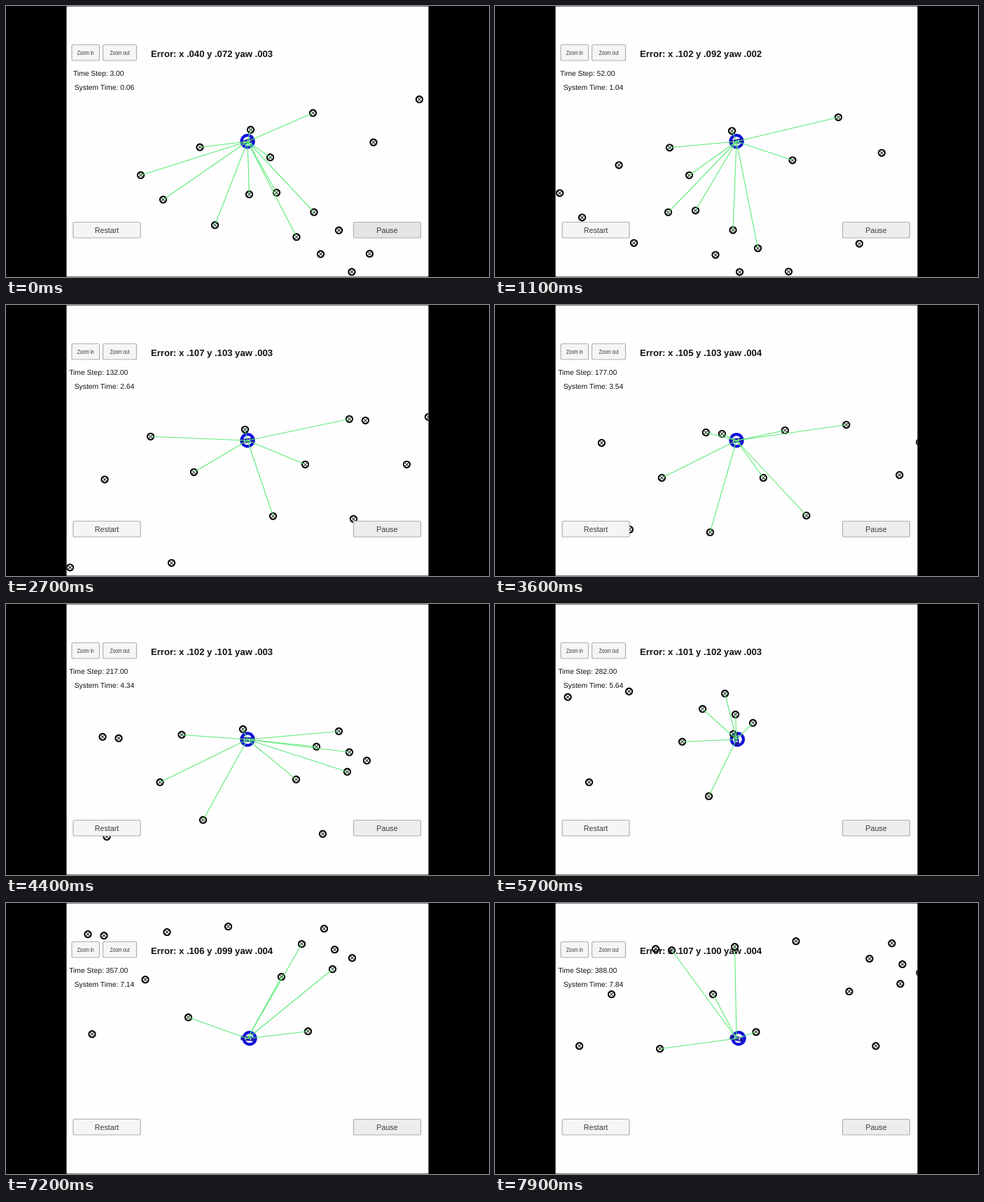
Recreate the animation shown at these times as an HTML page with a canvas. Size 690x388 px, loop 8000 ms.

```html
<!DOCTYPE html>
<html lang="en">
<head>
<meta charset="utf-8">
<title>Particle filter tracking</title>
<style>
html, body { margin: 0; width: 100%; height: 100%; overflow: hidden; background: #000; }
canvas { display: block; }
</style>
</head>
<body>
<canvas id="stage" width="690" height="388"></canvas>
<script>
const ctx = document.getElementById('stage').getContext('2d');
const LOOP = 8000, STEP = 100, RANGE = 162, LAST_TICK = 388;
const CAR = { x: 345, y: 194 };
const FONT = '"Liberation Sans", Arial, sans-serif';

// The map: landmark positions in the starting view
const landmarks = [
  [438, 153], [349, 177], [276.5, 202], [192, 242], [224, 277], [298, 313.5], [347, 269.5],
  [377, 216.5], [386, 267], [439.5, 295], [414.5, 330.5], [475, 321], [449, 355], [519, 354.5],
  [493.5, 380.5], [524.5, 195], [590, 133.5], [652, 184.5], [620, 314.5], [725, 123.5],
  [874, 108.5], [897, 110.5], [987, 105.5], [956, 173.5], [811, 173.5], [765, 247.5],
  [880, 251.5], [1074.5, 97.5], [1211.5, 100.5], [1179.5, 122.5], [1226.5, 130.5],
  [1251.5, 142.5], [1223.5, 158.5], [1150.5, 169.5], [1017.5, 227.5], [1188.5, 247.5]
];

// Key points of the drive: seconds, x, y
const route = [
  [0, 0, 0], [1.1, 100, -25.6], [2.7, 384, -54.6], [4.4, 736.5, -81.5], [4.9, 824, -76],
  [5.7, 883.5, -27.5], [6.5, 843.5, 60.5], [7.2, 757.5, 64], [7.9, 645, 43]
];

// Tracking errors in thousandths: they settle quickly, then waver
const errors = {
  x: t => 103.6 + 3.2 * Math.cos(2 * Math.PI * (t - 2.7) / 5) - 60.5 * Math.exp(-5 * t),
  y: t => 104.95 - .72 * t + 1.2 * Math.cos(2 * Math.PI * (t - 5.6) / 2.3)
    - 31.85 * Math.exp(-.722 * t * t),
  yaw: t => 2.8 + .1 * t - .5 * Math.sin(1.5 * t)
};

function slope(i, k) {
  const rate = j => (route[j + 1][k] - route[j][k]) / (route[j + 1][0] - route[j][0]);
  const last = route.length - 1;
  if (i === 0) return 1.5 * rate(0) - .5 * slope(1, k);
  if (i === last) return 1.5 * rate(last - 1) - .5 * slope(last - 1, k);
  const before = route[i][0] - route[i - 1][0], after = route[i + 1][0] - route[i][0];
  return (after * rate(i - 1) + before * rate(i)) / (before + after);
}

// Cubic Hermite curve through the unevenly spaced key points
function position(t) {
  let i = 0;
  while (i < route.length - 2 && t >= route[i + 1][0]) i++;
  const a = route[i], b = route[i + 1];
  const h = b[0] - a[0], u = (t - a[0]) / h, v = 1 - u;
  return [1, 2].map(k => v * v * (1 + 2 * u) * a[k] + u * u * (3 - 2 * u) * b[k]
    + h * u * v * (v * slope(i, k) - u * slope(i + 1, k)));
}

function text(str, x, y, size, align = 'left', color = '#111', weight = '') {
  ctx.font = `${weight} ${size}px ${FONT}`;
  ctx.textAlign = align;
  ctx.fillStyle = color;
  ctx.fillText(str, x, y);
}

function line(x1, y1, x2, y2) {
  ctx.beginPath();
  ctx.moveTo(x1, y1);
  ctx.lineTo(x2, y2);
  ctx.stroke();
}

function circle(x, y, r) {
  ctx.beginPath();
  ctx.arc(x, y, r, 0, 2 * Math.PI);
  ctx.stroke();
}

function button(label, x, y, w, h, size, fill, squash = 1) {
  ctx.fillStyle = fill;
  ctx.strokeStyle = '#b0b0b0';
  ctx.lineWidth = 1.2;
  ctx.beginPath();
  ctx.roundRect(x, y, w, h, 2);
  ctx.fill();
  ctx.stroke();
  ctx.save();
  ctx.translate(x + w / 2, y + h / 2);
  ctx.scale(squash, 1);
  text(label, 0, size * .36, size, 'center', '#3c3c3c');
  ctx.restore();
}

function landmark(x, y) {
  ctx.strokeStyle = '#2a2a2a';
  ctx.lineWidth = 1.1;
  line(x - 3, y - 3, x + 3, y + 3);
  line(x - 3, y + 3, x + 3, y - 3);
  ctx.strokeStyle = '#000';
  ctx.lineWidth = 2.1;
  circle(x, y, 4.6);
}

// The estimate is a ring that trails to the right of a car heading left
function car(angle) {
  ctx.strokeStyle = '#1010dc';
  ctx.lineWidth = 4.2;
  circle(CAR.x + 1.5 - 1.5 * Math.cos(angle), CAR.y - .2, 8.6);
  ctx.save();
  ctx.translate(CAR.x, CAR.y);
  ctx.rotate(angle);
  ctx.fillStyle = '#1a1aa8';
  ctx.fillRect(-9.5, -3.2, 19, 6.4);
  ctx.fillStyle = '#dfe6f4';
  ctx.fillRect(2, -2, 1.5, 4);
  ctx.fillRect(-5, -2, 1.5, 4);
  ctx.restore();
}

function draw(t) {
  const [px, py] = position(t), [ax, ay] = position(t - .02), [bx, by] = position(t + .02);
  const visible = landmarks.map(([x, y]) => [x - px + .5, y - py + .2]);

  ctx.fillStyle = '#000';
  ctx.fillRect(0, 0, 690, 388);
  ctx.save();
  ctx.beginPath();
  ctx.rect(86.5, .5, 517, 387);
  ctx.clip();
  ctx.fillStyle = '#fefefe';
  ctx.fillRect(86, 0, 518, 388);

  car(Math.atan2(by - ay, bx - ax));
  for (const [x, y] of visible) landmark(x, y);
  ctx.strokeStyle = '#5cea76';
  ctx.lineWidth = 1.1;
  for (const [x, y] of visible) {
    if (Math.hypot(x - CAR.x, y - CAR.y) < RANGE) line(CAR.x, CAR.y, x, y);
  }

  button('Zoom in', 94, 55.5, 39.5, 22.5, 9.5, '#f5f5f5', .7);
  button('Zoom out', 138.5, 55.5, 48, 22.5, 9.5, '#f5f5f5', .7);
  button('Restart', 96, 309.5, 96, 22.5, 10.7, '#f5f5f5');
  button('Pause', 496.5, 309.5, 96, 22.5, 10.7, t < .1 ? '#e5e3e5' : '#eeedee');

  const tick = Math.max(3, Math.round(t * 50) - 3);
  const report = Object.entries(errors)
    .map(([name, f]) => `${name} .${String(Math.round(f(t))).padStart(3, '0')}`).join(' ');
  ctx.textRendering = 'geometricPrecision';
  text(`Error: ${report}`, 207, 73, 13.1, 'left', '#111', 'bold');
  text(`Time Step: ${Math.min(tick, LAST_TICK).toFixed(2)}`, 132.2, 100.3, 10.35, 'center');
  text(`System Time: ${(tick / 50).toFixed(2)}`, 97.7, 119.5, 10.35);
  ctx.restore();
}

function frame() {
  const ms = performance.now() % LOOP;
  draw(Math.floor(ms / STEP) * STEP / 1000);
  requestAnimationFrame(frame);
}
frame();
</script>
</body>
</html>
```
